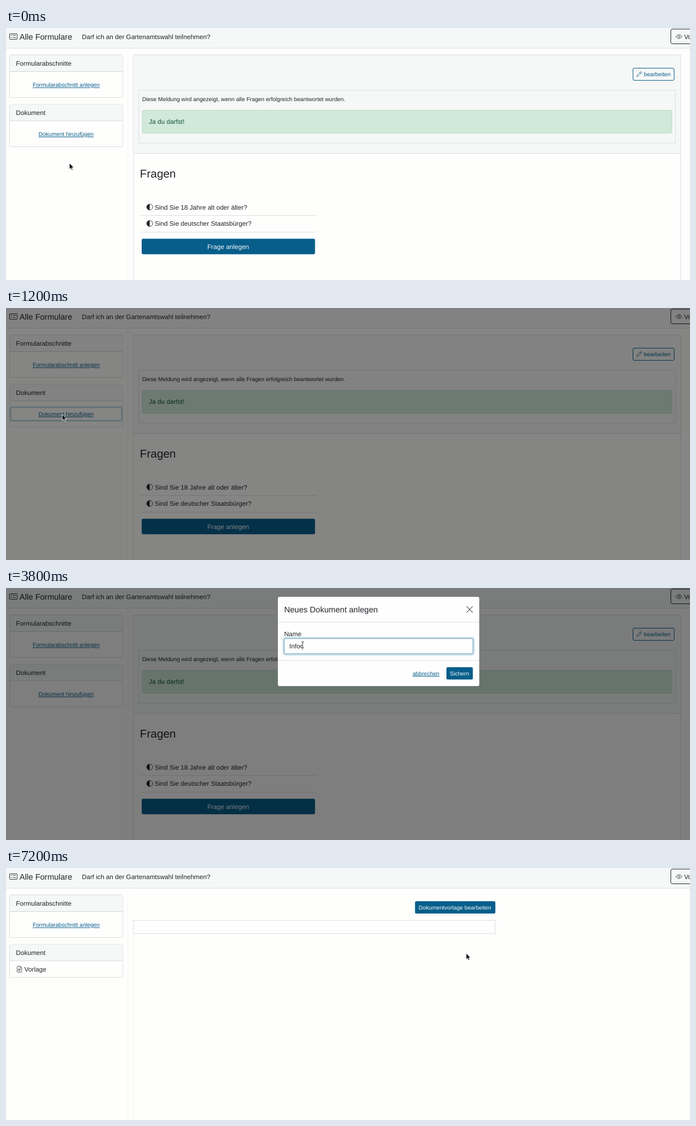
Recreate the animation shown at these times as an HTML page. Size 1230 by 455 pixels, loop 8000 ms.

```html
<!DOCTYPE html>
<html lang="de">
<head>
<meta charset="utf-8">
<title>Formular</title>
<style>
  html, body { margin: 0; width: 100%; height: 100%; overflow: hidden; background: #fefefd; }
  svg { display: block; width: 100vw; height: 100vh; }
  text { font: 11.65px "Liberation Sans", Arial, sans-serif; fill: #212529; text-rendering: geometricPrecision; white-space: pre; }
  .large { font-size: 14.57px; }
  .title { font-size: 20.4px; }
  .small { font-size: 10.19px; }
  .link { fill: #0a5f8c; text-decoration: underline; }
  .blue { fill: #0a5f8c; }
  .white { fill: #f4f8fa; }
  .green { fill: #14543a; }
  .line { fill: none; stroke: #dcdfe1; }
  .box { fill: #fefefd; stroke: #dadddd; }
  .shade { fill: #f6f8f7; }
  .primary { fill: #075e8a; }
  .icon { fill: none; stroke: #212529; stroke-width: 1; stroke-linecap: round; stroke-linejoin: round; }
  .ring { fill: none; stroke: #c1d9e4; stroke-width: 2.9; }
</style>
</head>
<body>
<svg viewBox="0 0 1230 455" preserveAspectRatio="none">
  <defs>
    <g id="half">
      <circle r="5.4" fill="none" stroke="#212529" stroke-width=".8"/>
      <path d="M0-5.4A5.4 5.4 0 0 0 0 5.4z" fill="#212529"/>
    </g>
  </defs>

  <rect width="1230" height="455" fill="#fefefd"/>
  <rect class="shade" width="1230" height="36"/>
  <path class="line" d="M0 36.5H1230"/>
  <path class="line" d="M219 37V455" stroke-opacity=".35"/>

  <g class="icon" transform="translate(6 8.2) scale(.91)">
    <rect x=".5" y="2.5" width="15" height="11" rx="1"/>
    <path d="M7.5 5.5h5M7.5 9.8h5M3 5.4l.8.8 1.5-1.5M3 9.7l.8.8 1.5-1.5"/>
  </g>
  <text class="large" x="24.3" y="20.5">Alle Formulare</text>
  <text x="136.5" y="20">Darf ich an der Gartenamtswahl teilnehmen?</text>
  <rect x="1195.5" y="2" width="80" height="26.5" rx="3" fill="none" stroke="#212529"/>
  <g class="icon" transform="translate(1204.4 9.7) scale(.728)">
    <path d="M.6 8C2 5.5 4.700 3 8 3s6 2.500 7.400 5C14 10.500 11.300 13 8 13S2 10.500.6 8z"/>
    <circle cx="8" cy="8" r="2.500"/>
  </g>
  <text x="1219.5" y="20">Vorschau</text>

  <rect class="box" x="6.500" y="48.500" width="203.500" height="77" rx="2.500"/>
  <path class="shade" d="M7 49H209.500V78H7z"/>
  <path class="line" d="M6.500 78.500H210" style="stroke:#d2d5d6"/>
  <text x="18" y="67.500">Formularabschnitte</text>
  <text class="small link" x="48" y="106.300">Formularabschnitt anlegen</text>

  <rect class="box" id="docCard" x="6.500" y="138" width="203.500" height="76.500" rx="2.500"/>
  <path class="shade" d="M7 138.500H209.500V167H7z"/>
  <path class="line" d="M6.500 167.500H210"/>
  <text x="18" y="157.200">Dokument</text>

  <g id="formPage">
    <text class="small link" x="58.500" y="195.200">Dokument hinzufügen</text>
    <rect class="ring" id="linkRing" x="8.300" y="179" width="200" height="24.500" rx="3"/>

    <path class="line" d="M229 455V48.500H1213.500V455"/>
    <path class="shade" d="M229.500 49H1213V226H229.500z"/>
    <path class="line" d="M229 226.500H1213.500"/>
    <rect x="1127.500" y="72.500" width="74" height="22" rx="2.500" fill="none" stroke="#0a5f8c"/>
    <path class="icon" transform="translate(1133.700 78.200) scale(.637)" style="stroke:#0a5f8c;stroke-width:1.200"
      d="M12.500.9l2.600 2.600L5 13.600.9 15.100 2.400 11zM10.200 3.200l2.600 2.600"/>
    <text class="small blue" x="1147" y="87.200">bearbeiten</text>
    <rect class="line" x="238.500" y="112.500" width="965.500" height="95.500"/>
    <text class="small" x="244.700" y="131.700">Diese Meldung wird angezeigt, wenn alle Fragen erfolgreich beantwortet wurden.</text>
    <rect x="245" y="148.500" width="952.500" height="41.500" rx="2.500" fill="#d0e9d9" stroke="#bfdccb"/>
    <text class="green" x="257" y="173.200">Ja du darfst!</text>

    <text class="title" x="240.800" y="269.500">Fragen</text>
    <use href="#half" x="258.400" y="323.300"/>
    <text x="267.500" y="327.700">Sind Sie 18 Jahre alt oder älter?</text>
    <use href="#half" x="258.400" y="353"/>
    <text x="267.500" y="357.400">Sind Sie deutscher Staatsbürger?</text>
    <path class="line" d="M241 338.500H558.500M241 368.500H558.500"/>
    <rect class="primary" x="244" y="380.500" width="311.700" height="28" rx="2.700"/>
    <text class="white" x="362" y="398.500">Frage anlegen</text>
  </g>

  <g id="docPage">
    <g class="icon" transform="translate(18.200 177) scale(.728)">
      <path d="M9.500.5H4A1.500 1.500 0 0 0 2.500 2v12A1.500 1.500 0 0 0 4 15.500h8a1.500 1.500 0 0 0 1.500-1.500V4.500zM9.500.5v3a1 1 0 0 0 1 1h3"/>
      <path d="M5.500 7.500h5M5.500 9.700h5M5.500 12h3"/>
    </g>
    <text x="33" y="187.300">Vorlage</text>
    <rect class="primary" x="735.500" y="60" width="144.500" height="22.200" rx="2.500"/>
    <text class="small white" x="742" y="75">Dokumentvorlage bearbeiten</text>
    <rect class="line" x="229" y="94.500" width="650.500" height="24"/>
    <path class="line" d="M229 119V455" stroke-opacity=".3"/>
  </g>

  <rect id="backdrop" width="1230" height="455"/>

  <g id="modal">
    <rect x="488.500" y="15.500" width="363" height="162" rx="3.500" fill="#fefefe" stroke="#000" stroke-opacity=".3"/>
    <path class="line" d="M489 61.500H851M489 130.500H851"/>
    <text class="large" x="500.200" y="43.800">Neues Dokument anlegen</text>
    <path d="M828.500 33.500l10.400 10.400m0-10.400l-10.400 10.400" stroke="#777" stroke-width="1.400" stroke-linecap="round"/>
    <text x="500.200" y="87">Name</text>
    <rect class="ring" id="inputRing" x="499" y="90" width="342" height="30.200" rx="3.500"/>
    <rect id="input" x="500.500" y="91.500" width="339" height="27" rx="2.500" fill="#fefefe"/>
    <text id="typed" x="509.600" y="109.200"></text>
    <rect id="caret" y="98" width=".9" height="13.500" fill="#212529"/>
    <text class="small link" x="731.200" y="157.800">abbrechen</text>
    <rect id="saveRing" class="ring" x="790.700" y="141.600" width="50" height="24.800" rx="3.500" style="stroke:#83afc5"/>
    <rect id="save" x="792" y="143" width="47.500" height="22.200" rx="2.500"/>
    <text class="small white" x="798.300" y="157.800">Sichern</text>
  </g>

  <g id="pointer">
    <path id="arrow" d="M0 0V11.200L2.600 8.800 4.400 12.800 6.200 12 4.500 8.100H8z" fill="#111" stroke="#fff" stroke-width=".8"/>
    <path id="hand" d="M-1.200.8Q0-1 1.200.8V5Q2.500 4 3.400 5.300 4.700 4.500 5.400 5.900 7 5.600 7 7.200V9.500Q6.600 11 6 13H-.2Q-1-1 -1.200 0z" fill="#fff" stroke="#111" stroke-width=".9" stroke-linejoin="round"/>
    <g id="beam" fill="none" stroke-linecap="round">
      <path d="M-2-5.500Q0-5.500 0-4.500 0-5.500 2-5.500M0-4.500V4.500M-2 5.500Q0 5.500 0 4.500 0 5.500 2 5.500" stroke="#fff" stroke-width="2"/>
      <path d="M-2-5.500Q0-5.500 0-4.500 0-5.500 2-5.500M0-4.500V4.500M-2 5.500Q0 5.500 0 4.500 0 5.500 2 5.500" stroke="#222" stroke-width=".9"/>
    </g>
  </g>
</svg>
<script>
  const LOOP = 8000, TICK = 100;
  const el = id => document.getElementById(id);
  const clamp = v => Math.min(1, Math.max(0, v));
  const show = (id, on) => el(id).setAttribute('visibility', on ? 'visible' : 'hidden');
  const set = (id, attrs) => Object.entries(attrs).forEach(([k, v]) => el(id).setAttribute(k, v));

  const WORD = 'Information';
  // [time, letters typed]
  const TYPING = [[3200, 2], [3400, 3], [3700, 4], [3800, 5], [4600, 6], [4700, 7], [5200, 8], [5300, 10], [5500, 11]];
  // [time, x, y], eased in between
  const PATH = [
    [0, 114, 244], [300, 114, 244], [400, 109.5, 225], [500, 109.5, 225], [600, 104, 200],
    [800, 103, 192], [1100, 103, 192], [1200, 101, 192], [1400, 101, 192], [2300, 533.5, 102.5],
    [6000, 533.5, 102.5], [6100, 538, 110], [6200, 538, 110], [6300, 700, 160],
    [6400, 827, 176], [6500, 827, 176], [6600, 827.5, 154], [LOOP, 827.5, 154]
  ];

  function pointerAt(t) {
    const i = PATH.findIndex(p => p[0] > t);
    const [t0, x0, y0] = PATH[i - 1], [t1, x1, y1] = PATH[i];
    const u = (t - t0) / (t1 - t0), e = u * u * (3 - 2 * u);
    return [x0 + (x1 - x0) * e, y0 + (y1 - y0) * e];
  }

  function pointerKind(t, x, y) {
    const inside = (l, top, r, b) => x >= l && x <= r && y >= top && y <= b;
    if (t < 1100) return inside(9, 179, 208, 204) ? 'hand' : 'arrow';
    if (t >= 7200) return 'arrow';
    if (t >= 1500 && inside(500, 91, 840, 119)) return 'beam';
    return inside(792, 143, 840, 165) ? 'hand' : 'arrow';
  }

  function render(t) {
    const saved = t >= 7200;
    const clicked = t >= 6800;
    const focused = t >= 2500 && !clicked;

    show('formPage', !saved);
    show('docPage', saved);
    show('linkRing', t >= 1000 && t < 1500);
    set('docCard', { height: saved ? 59.5 : 76.5 });

    const dim = t < 1100 || saved ? 0 : Math.min(.5, .2 + (t - 1100) * .0028);
    set('backdrop', { 'fill-opacity': dim });

    const slide = clamp((t - 1210) / 300);
    set('modal', {
      opacity: saved ? 0 : clamp((t - 1210) / 150),
      transform: `translate(0 ${-36.4 * (1 - slide) ** 1.8})`
    });

    const step = TYPING.filter(k => k[0] <= t).pop();
    el('typed').textContent = WORD.slice(0, step ? step[1] : 0);
    set('caret', { x: 509.6 + (step ? el('typed').getComputedTextLength() : 0), opacity: focused && t < 5700 ? 1 : 0 });
    set('inputRing', { opacity: focused ? 1 : 0 });
    set('input', { stroke: focused ? '#83afc5' : '#ced4da' });
    set('saveRing', { opacity: clicked ? 1 : 0 });
    set('save', { fill: t >= 6600 ? '#064b6e' : '#075e8a' });

    const [x, y] = pointerAt(t), kind = pointerKind(t, x, y);
    set('pointer', { transform: `translate(${x} ${y})` });
    for (const id of ['arrow', 'hand', 'beam']) show(id, id === kind);
  }

  function frame() {
    const t = performance.now() % LOOP;
    render(Math.floor(t / TICK) * TICK);
    requestAnimationFrame(frame);
  }
  frame();
</script>
</body>
</html>
```
